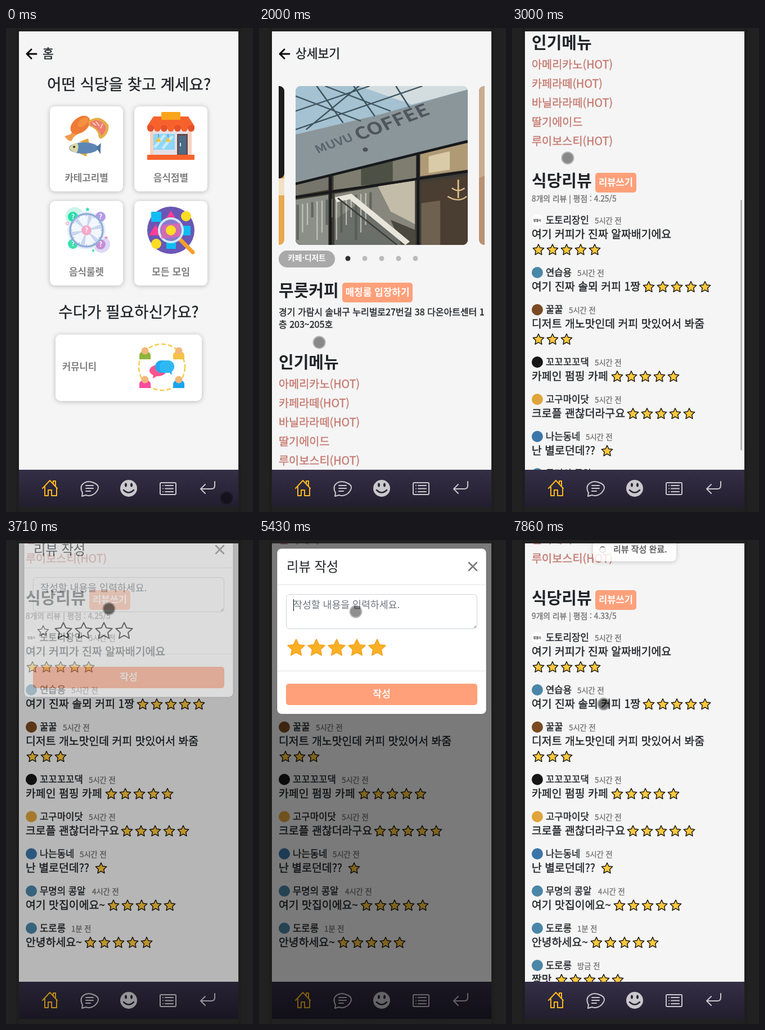
Animation, 439 px wide and 859 px high, one loop 8 s. Source, as an HTML page:

```html
<!DOCTYPE html>
<html lang="ko">
<head>
<meta charset="utf-8">
<style>
html, body { margin: 0; width: 100%; height: 100%; overflow: hidden; background: #212122; }
svg { display: block; }
#stage { width: 100vw; height: 100vh; }
text { font-family: "Noto Sans CJK KR", "Noto Sans CJK", sans-serif; white-space: pre; }
.card { filter: drop-shadow(0 1px 4px rgba(0,0,0,.25)); }
</style>
</head>
<body>
<script>
const INK = '#212529', SALMON = '#ffa07a', GREY = '#808080';
const LOOP = 8000, FRAME = 1000 / 7;

// Shape helpers
const R = (x, y, w, h, r, fill, more = '') => `<rect x="${x}" y="${y}" width="${w}" height="${h}" rx="${r}" fill="${fill}" ${more}/>`;
const C = (x, y, r, fill, more = '') => `<circle cx="${x}" cy="${y}" r="${r}" fill="${fill}" ${more}/>`;
const E = (x, y, rx, ry, fill, turn = 0) => `<ellipse cx="${x}" cy="${y}" rx="${rx}" ry="${ry}" fill="${fill}" transform="rotate(${turn} ${x} ${y})"/>`;
const F = (d, fill, more = '') => `<path d="${d}" fill="${fill}" ${more}/>`;
const L = (d, color, w, more = '') => `<path d="${d}" fill="none" stroke="${color}" stroke-width="${w}" ${more}/>`;
// Medium text gets a hairline stroke, as only regular and bold may be installed
const T = (x, y, size, text, fill = INK, weight = 500, more = '') =>
  `<text x="${x}" y="${y + size * .37}" font-size="${size}" font-weight="${weight}" fill="${fill}" ${weight === 500 ? `stroke="${fill}" stroke-width=".4"` : ''} ${more}>${text}</text>`;
const M = (x, y, size, text, fill, weight) => T(x, y, size, text, fill, weight, 'text-anchor="middle"');
const G = (id, body, more = '') => `<g id="${id}" ${more}>${body}</g>`;
const rep = (n, f) => Array.from({ length: n }, (_, i) => f(i)).join('');
const star = (x, y, r, more) => {
  const pts = rep(10, i => {
    const a = i * Math.PI / 5 - Math.PI / 2, q = i % 2 ? r * .48 : r;
    return `${(x + q * Math.cos(a)).toFixed(1)},${(y + q * Math.sin(a)).toFixed(1)} `;
  });
  return `<polygon points="${pts}" stroke-linejoin="round" ${more}/>`;
};
let clips = 0;
const photo = (id, x, y, w, h) => {
  const c = 'clip' + clips++;
  return `<clipPath id="${c}">${R(x, y, w, h, 9, '#000')}</clipPath>
    <g clip-path="url(#${c})"><use href="#${id}" x="${x}" y="${y}" width="${w}" height="${h}"/></g>`;
};
const scene = (id, body) => `<symbol id="${id}" viewBox="0 0 163 190" preserveAspectRatio="none">${body}</symbol>`;

const cafe = scene('cafe',
  R(0, 0, 163, 190, 0, '#8b969b') + F('M0 0H163V4L80 34 0 58Z', '#a5c2d2') + F('M60 0H163V4L110 22Z', '#d3dde0') +
  L('M0 30L70 0M0 52L120 0M20 0L45 44M55 0L75 36M95 0L108 26M10 52L60 0M0 12L62 42M28 0L90 30', '#40555f', 1.5) +
  F('M0 117L163 66V190H0Z', '#3f3b35') +
  F('M0 118L31 108V124L0 131Z', '#75756b') + F('M36 106L114 82V112L36 124Z', '#7e7d70') + F('M62 98L92 90V116L62 119Z', '#4d5044') +
  F('M118 81L163 68V100L118 108Z', '#b09a76') + F('M126 84l20-6v22l-20 4z', '#d9cba8') +
  F('M0 136L31 130V190H0Z', '#8b8f87') + F('M37 129L113 113V190H37Z', '#87877d') +
  F('M78 120L113 113V165L90 150Z', '#c3bca8') + F('M37 160L60 140 108 190H37Z', '#6b6f69') + F('M90 160L113 172V190H100Z', '#4b483f') +
  F('M119 115L163 107V190H119Z', '#4a3d32') + F('M119 140l18-3v53h-18z', '#6e614f') +
  rep(16, i => L(`M${2 + i * 4.6} ${142 - i}V${184 - i % 4 * 9}`, i % 3 ? '#d6d9cf' : '#4e574f', i % 3 ? 1.2 : 2.2, 'opacity=".7"')) +
  L('M38 136L52 132 106 188', '#e8e5da', 6) + L('M40 134L96 190', '#3b3d39', 1.5) +
  L('M0 133L163 102M0 117L163 66', '#17191b', 3) + L('M33 108V190M116 82V190', '#17191b', 2.5) +
  L('M148 122q6 6 12 0M154 112v22M144 132q10 8 18 0', '#e0c088', 1.5) +
  C(66, 76, 2.5, '#4b5155') +
  `<g transform="rotate(-25 21 81)">${T(21, 76, 13, 'MUVU', '#5b656b', 700)}</g>
   <g transform="rotate(-25 60 66)">${T(60, 58, 20, 'COFFEE', '#4e575c', 700)}</g>`);

const wing = (x, y, turn) => `<g transform="translate(${x} ${y}) rotate(${turn})">` + R(-17, -16, 34, 32, 9, '#a8652c') +
  rep(9, i => R(-13 + i % 3 * 9.5, -12 + (i / 3 | 0) * 9, 6.5, 6, 1.5, '#653716')) + L('M-14 -14H14', '#d39a52', 2) + '</g>';
const waffle = scene('waffle',
  R(0, 0, 163, 190, 0, '#b99274') + F('M0 0H163V40L90 60 0 110Z', '#c9ab90') + F('M100 0H163V70L110 45Z', '#dac7b2') +
  F('M20 92L112 48 163 130V152L30 190Z', '#6d6960') + F('M26 95L110 54 157 136 36 182Z', '#979186') +
  F('M100 87L126 76 152 126 128 143Z', '#bdbdc2') + L('M112 84L140 134', '#9c9ca4', 2) +
  C(65, 129, 44, '#201f22') + C(65, 129, 35, '#333135') +
  wing(47, 116, 35) + wing(87, 117, -35) + wing(67, 142, 0) +
  E(68, 118, 13, 15, '#e3bb8a') + E(70, 114, 8, 9, '#f1dcbb') +
  L('M88 62L110 128M100 66L112 118', '#222124', 4) +
  F('M7 22L43 16 47 88 30 94Z', '#e4dfda') + F('M8 24L43 18 44 50 14 56Z', '#8a5540') + E(25, 20, 19, 8, '#cfc6bd', -8) + E(25, 17, 13, 4, '#a5826b', -8) +
  F('M54 12L86 8 83 68 64 72Z', '#e9e5e0') + F('M55 14L85 10 83 36 58 42Z', '#8f5a40') + E(70, 10, 17, 7, '#d3cac1', -6) + E(70, 7, 11, 3, '#a5826b', -6) +
  L('M26 20L20 0M72 8L76 0', '#f3f0ec', 3));

const shrimp = scene('shrimp',
  R(0, 0, 163, 190, 0, '#f0efed') + E(70, 20, 90, 50, '#fafaf9') +
  F('M0 108Q30 85 70 108T163 100V190H0Z', '#c99f70') + E(18, 122, 22, 14, '#a9a46c') + E(20, 112, 9, 6, '#c7583f') + E(6, 136, 14, 9, '#d2755a') +
  E(34, 155, 40, 20, '#e9cda4') + E(24, 166, 26, 9, '#a8713f') + E(115, 128, 34, 22, '#b37342') + E(140, 152, 32, 18, '#ecd3b1') + E(90, 172, 40, 14, '#8c5730') +
  E(50, 140, 10, 5, '#6c6632', 30) + E(136, 118, 18, 10, '#6d3d25', -15) + E(110, 156, 20, 9, '#dbb17d', 10) + E(152, 174, 18, 7, '#7c4a2b', -20) +
  F('M0 168Q70 190 163 178V190H0Z', '#f6f1e8') +
  F('M163 15L112 40 118 47 163 25ZM163 42L112 67 114 75 163 52Z', '#1d1a1b') +
  E(95, 52, 30, 19, '#966127', 10) + E(96, 47, 20, 9, '#c3924c', 12) + E(86, 74, 20, 30, '#eabb84', 50) + E(84, 70, 10, 18, '#f7dab0', 50) + E(112, 60, 19, 15, '#cc9755', 20) +
  E(82, 106, 25, 32, '#eec2a0', -25) + F('M64 88Q84 108 104 112L92 122Q68 112 58 98Z', '#dd5230') +
  F('M58 116Q68 134 86 142L80 160 64 150Z', '#cf4126') + E(92, 126, 12, 18, '#f7e2cf', -20));

const map = scene('map',
  R(0, 0, 163, 190, 0, '#2f363b') +
  F('M75 48L112 44 124 62 116 76 92 74 78 62Z', '#36491f') +
  rep(24, i => C(82 + i % 6 * 6 + (i % 12 > 5 ? 3 : 0), 51 + (i / 6 | 0) * 6, .9, '#b7c93f')) +
  L('M35 82L62 72 76 92 58 120 38 108ZM76 92L110 98 128 80M58 120L86 132 100 180M110 98L104 140 118 160M68 120L60 150 66 190M62 72L56 45M86 132L140 128M104 140L90 165M128 80L140 100', '#4b5359', 2.2, 'stroke-linejoin="round"') +
  L('M78 48Q74 38 80 30q4-4-1-6M72 22q8 2 16-2', '#dcc57c', 1) +
  C(110, 95, 4, '#7eb07e') + T(104, 90, 5, '숲길', '#ddd', 400) +
  rep(12, i => T(20 + i * 47 % 110, 36 + i * 31 % 120, 4, '골목길', '#9aa0a5', 400)));

const arrow = L('M54 46H37M45 38L37 46 45 54', '#0a0a0a', 3, 'stroke-linecap="round" stroke-linejoin="round"');
const head = title => arrow + T(65, 45.5, 21.5, title);
const card = (x, y, w, h) => R(x, y, w, h, 9, '#fff', 'class="card"');
const button = (x, y, w, h, size, text, weight = 700) => R(x, y, w, h, 5, SALMON) + M(x + w / 2, y + h / 2 - 1, size, text, '#fff', weight);

// Home screen
const food =
  F('M104 192L114 189 123 179 130 186 120 194 116 201 110 199Z', '#f39a4b') +
  E(132, 172, 20, 13, '#ef7b35', -40) + E(137, 167, 11, 6, '#f59043', -40) +
  F('M146 166Q166 150 182 172Q184 188 170 196Q164 198 164 188Q160 178 148 174Z', '#e3ae48') +
  F('M149 168Q165 157 177 174Q179 184 169 191Q167 180 150 172Z', '#f07a70') +
  L('M160 166l6 8M172 170l-4 8M154 168l6 5', '#fbd0c5', 2) +
  F('M130 202l16-6 2 9zM128 221l14 7 4-9z', '#e0a43e') + E(138, 213, 26, 10, '#5e86b5') +
  F('M160 212L169 204 168 213 168 224Z', '#4d76a4') + F('M112 213Q118 204 127 204Q131 213 125 222Q116 219 112 213Z', '#dcd7a6') + C(121, 211, 2, '#333');
const shop =
  R(256, 182, 74, 44, 0, '#e3e0e6') + R(256, 182, 6, 44, 0, '#f5d2c2') + R(324, 182, 6, 44, 0, '#f5d2c2') +
  R(262, 188, 38, 28, 0, '#8fd5f7') + L('M264 212L282 190M278 214L296 192', '#c4edff', 5) +
  F('M266 202l5-8 5 8zM283 202l5-8 5 8z', '#fbc531') + L('M271 188v6M288 188v6', '#667', 1) +
  R(304, 188, 19, 38, 0, '#6a4a4a') + R(307, 191, 13, 33, 0, '#4a6c86') + R(309, 204, 2, 6, 0, '#d9e7ee') +
  F('M262 157H324L335 174V178H251V174Z', '#f7622c') + rep(7, i => C(257 + i * 12, 178, 6, i % 2 ? '#f7622c' : '#e5512a')) +
  R(276, 149, 34, 14, 2, '#f9a51c') + R(251, 225, 84, 9, 1, '#f7622c');
const wheel =
  C(122, 334, 16, '#c9f5e8') + C(170, 384, 15, '#dcd8f6') + C(143, 359, 34, '#e6eefb') +
  [[119, 335, '#26e0a9'], [168, 335, '#b39be6'], [119, 383, '#3fdfae'], [168, 384, '#c78fd6']].map(([x, y, c]) =>
    C(x, y, 9, c) + M(x, y, 12, '?', '#fff', 700)).join('') +
  C(143, 359, 29, '#f2f7ff', 'stroke="#93add8" stroke-width="3.5"') +
  rep(6, i => F('M143 359L139 332H147Z', '#c9d6ee', `transform="rotate(${i * 60 + 15} 143 359)"`)) +
  rep(12, i => C(143, 333, 1, '#8fb7dd', `transform="rotate(${i * 30} 143 359)"`)) +
  C(143, 359, 9, '#f6a9cb') + M(143, 359, 12, '?', '#fff', 700) +
  star(145, 322, 4, 'fill="#26e0a9"') + star(178, 372, 3, 'fill="#ee7fb0"') + C(109, 347, 2.5, 'none', 'stroke="#ee7fb0"') + star(155, 395, 3, 'fill="#26e0a9"');
const finder =
  C(293, 359, 42, '#6a56b5') + R(258, 326, 18, 18, 0, '#10bdf2') + F('M293 324L305 344H281Z', '#fd3d98') + C(320, 334, 9, '#fbdd25') +
  F('M266 349L278 368H254Z', '#fd3d98') + R(311, 351, 17, 17, 0, '#10bdf2') + C(267, 383, 9, '#fbdd25') + R(285, 375, 17, 17, 0, '#10bdf2') +
  L('M310 376L332 398', '#f7a02d', 7, 'stroke-linecap="round"') + C(293, 359, 21, '#8a79cb', 'stroke="#cfeafc" stroke-width="4"') +
  F('M276 350l34-4v24l-34 4z', '#f066ab', 'opacity=".7"') + C(293, 359, 9, '#fbdd25');
const person = (x, y, c) => F(`M${x - 10} ${y + 11}V${y + 3}Q${x - 9} ${y - 3} ${x} ${y - 3}T${x + 10} ${y + 3}V${y + 11}Z`, c) + C(x, y - 4, 6.5, '#f2b778');
const talk =
  C(277, 602, 41, 'none', 'stroke="#f8cb4d" stroke-width="2.5" stroke-dasharray="8 4"') +
  person(247, 577, '#8fb53a') + person(307, 577, '#f5c243') + person(247, 628, '#f94c9e') + person(307, 628, '#1aa5ee') +
  E(270, 608, 15, 10, '#fb5590') + F('M262 614l-1 8 10-6z', '#fb5590') +
  R(265, 590, 34, 22, 11, '#21a9f5') + F('M288 608l6 8 1-9z', '#21a9f5') + R(273, 590, 26, 22, 11, '#39c4f3', 'opacity=".6"');
const home = head('홈') + M(218.5, 100, 27.7, '어떤 식당을 찾고 계세요?') +
  card(78, 139, 130, 151) + card(228, 139, 130, 151) + card(78, 307, 130, 150) + card(228, 307, 130, 150) +
  food + shop + wheel + finder +
  M(143, 266, 16.8, '카테고리별', GREY, 700) + M(293, 266, 16.8, '음식점별', GREY, 700) +
  M(143, 433, 16.8, '음식룰렛', GREY, 700) + M(293, 433, 17.2, '모든 모임', GREY, 700) +
  M(218, 504, 27.6, '수다가 필요하신가요?') + card(88, 544, 260, 118) + T(100, 601, 16.6, '커뮤니티', GREY, 700) + talk;

// List screen
const rule = y => R(35, y, 366, 1, 0, '#bdbdbd');
const place = (n, y, a, b, kind, name, far) =>
  photo(a, 45, y, 163, 191) + photo(b, 228, y, 163, 191) +
  R(45, y + 201, 30, 30, 8, '#8b8e8b') + M(60, y + 214, 14, n, '#fff', 700) +
  R(80, y + 201, 100, 30, 15, '#ff8d7a') + M(130, y + 214, 13.7, kind, '#fff', 700) +
  T(45, y + 252, 24.2, name, '#0a0a0a') + T(45, y + 289, 17.6, far);
const list = head('모든 목록') +
  R(45.5, 98.5, 253, 34, 5, '#fff', 'stroke="#333"') + T(56, 114, 17, '검색어를 입력하세요', '#757575') +
  button(336, 98, 55, 35, 17.4, '검색') + rule(149) +
  place(1, 176, 'cafe', 'waffle', '카페·디저트', '무릇커피', '별점거리 48.04km') + rule(495) +
  place(2, 522, 'shrimp', 'map', '중식', '두메차이나 솔뫼점', '');

// Detail screen: [avatar, name, time x, time, text, row y, stars x, star line offset, stars]
const reviews = [
  ['#fff', '도토리장인', 147, '5시간 전', '여기 커피가 진짜 알짜배기에요', 709, 47, 52, 5],
  ['#4a86a8', '연습용', 116, '5시간 전', '여기 진짜 솔뫼 커피 1짱', 802, 243, 25, 5],
  ['#7a4a22', '꿀꿀', 101, '5시간 전', '디저트 개노맛인데 커피 맛있어서 봐줌', 868, 47, 52, 3],
  ['#161616', '꼬꼬꼬꼬댁', 147, '5시간 전', '카페인 펌핑 카페', 961, 187, 25, 5],
  ['#e0a43c', '고구마이닷', 147, '5시간 전', '크로플 괜찮더라구요', 1027, 215, 25, 5],
  ['#3b76a8', '나는동네', 131, '5시간 전', '난 별로던데??', 1093, 169, 25, 1],
  ['#4a86a8', '무명의 콩알', 153, '4시간 전', '여기 맛집이에요~', 1159, 191, 25, 5],
  ['#4a86a8', '도로롱', 116, '1분 전', '안녕하세요~', 1225, 150, 25, 5],
  ['#4a86a8', '도로롱', 116, '방금 전', '짱맛', 1291, 88, 25, 5]
];
const review = ([color, name, tx, when, text, y, sx, dy, n], i) => G('review' + i,
  C(45, y, 10, color) + (i ? '' : M(45, y, 5, '밥톨이', '#222', 700)) +
  T(60, y - .5, 16.7, name) + T(tx, y + 1, 13.3, when, '#777') + T(35, y + 24.5, 19.4, text) +
  rep(n, k => star(sx + k * 25, y + dy + 1, 10.2, 'fill="#ffc83d" stroke="#111" stroke-width="1.4"')));
const menu = ['아메리카노(HOT)', '카페라떼(HOT)', '바닐라라떼(HOT)', '딸기에이드', '루이보스티(HOT)'];
const detail =
  `<g transform="translate(0 -199)">${head('상세보기')}</g>` +
  `<clipPath id="rail">${R(35, -97, 366, 284, 0, '#000')}</clipPath><g clip-path="url(#rail)">` +
  R(-261, -96, 306, 282, 9, '#e8a850') + R(-261, -96, 306, 164, 9, '#1d1b1c') + R(35, 68, 10, 30, 0, '#f0e0c4') +
  photo('cafe', 65, -96, 306, 282) + photo('waffle', 391, -96, 306, 282) + '</g>' +
  R(35, 196, 100, 30, 15, '#a9a9a9') + M(85, 209, 13.7, '카페·디저트', '#fff', 700) +
  rep(5, i => C(158 + i * 30, 210, 4.5, i ? '#bbb' : '#333')) +
  T(35, 267, 29, '무릇커피', INK, 700) + button(148, 253, 125, 35, 17, '매칭룸 입장하기') +
  T(35, 305, 16, '경기 가람시 솔내구 누리벌로27번길 38 다온아트센터 1') + T(35, 327, 16, '층 203~205호') +
  T(35, 394, 29, '인기메뉴', INK, 700) + menu.map((m, i) => T(35, 433 + i * 34, 19.7, m, '#c67a70')).join('') +
  T(35, 639, 29, '식당리뷰', INK, 700) + button(148, 625, 73, 35, 16.6, '리뷰쓰기') +
  T(35, 671, 13.8, '', '#777', 500, 'id="score"') + reviews.map(review).join('');

const line = 'stroke-linecap="round" stroke-linejoin="round"', PALE = '#c9c8cc';
const nav = R(23, 784, 390, 66, 0, 'url(#dusk)') +
  L('M65 817L78 803 91 817M69 814V830H75V820H81V830H90V816M84 808V804H88V813', '#fbb81e', 2, line) +
  L('M136 825Q130 814 138 808T158 808T158 826Q150 832 142 829L135 831ZM142 812h13M142 817h13M142 822h8', PALE, 2, line) +
  C(218, 817, 15, PALE) + E(213, 811, 2, 3.5, '#2b2639') + E(223, 811, 2, 3.5, '#2b2639') + L('M209 820Q218 829 227 820', '#2b2639', 2.5, line) +
  L('M276 807H300Q302 807 302 809V826Q302 828 300 828H276Q274 828 274 826V809Q274 807 276 807ZM283 812H297M283 817.5H297M283 823H297M279 812h.1M279 817.5h.1M279 823h.1', PALE, 2, line) +
  L('M371 805V812Q371 818 365 818H347M354 810L346 818 354 826', PALE, 2, line);

const modal =
  R(32, 15, 372, 294, 8, '#fff', 'stroke="#000" stroke-opacity=".3"') + T(49, 47, 23.3, '리뷰 작성', INK, 300) +
  L('M373 40L387 54M387 40L373 54', '#777', 2.5, line) + R(32, 79, 372, 1, 0, '#dee2e6') + R(32, 232, 372, 1, 0, '#dee2e6') +
  R(46, 94, 344, 66, 8, 'none', 'id="ring" stroke="#c2dbfe" stroke-width="4"') +
  R(48.5, 96.5, 339, 61, 6, '#fff', 'id="field"') + L('M382 156l4-4M385 156l1-1', '#555', 1) +
  T(61, 115, 17.3, '작성할 내용을 입력하세요.', '#6c757d', 400, 'id="hint"') + T(61, 115, 17.4, '', INK, 400, 'id="typed"') +
  R(0, 123, 16, 1, 0, INK, 'id="under"') + R(0, 105, 1, 21, 0, '#000', 'id="caret"') +
  rep(5, i => `<g transform="translate(${66 + i * 36} 192)">${star(0, 0, 15.5, 'class="rate" stroke-width="2"')}</g>`) +
  button(48, 255, 340, 38, 17.4, '작성', 500);

const toast = R(144, -22, 148, 44, 8, '#fff', 'class="card"') +
  C(161, 1, 5, 'none', 'stroke="#e0e0e0" stroke-width="2"') + L('M161 -4A5 5 0 0 1 166 1', '#616161', 2, 'id="spin"') + T(180, 0, 15, '리뷰 작성 완료.', '#363636');

document.body.innerHTML = `<svg id="stage" viewBox="0 0 439 859" preserveAspectRatio="none"><defs>
  <linearGradient id="dusk" x2="0" y2="1"><stop stop-color="#352f46"/><stop offset="1" stop-color="#221e2f"/></linearGradient>
  <clipPath id="screen">${R(23, 6, 390, 844, 0, '#000')}</clipPath>${cafe + waffle + shrimp + map}</defs>` +
  R(0, 0, 439, 859, 0, '#212122') + R(18, 0, 5, 859, 0, '#1e1e1f') + R(413, 0, 5, 859, 0, '#1e1e1f') +
  `<g clip-path="url(#screen)">` + R(23, 6, 390, 844, 0, '#f5f5f5') +
  G('home', home) + G('list', list) + G('detail', detail) + nav + R(406, 0, 3, 445, 1.5, '#b4b4b4', 'id="bar"') +
  R(23, 6, 390, 844, 0, '#000', 'id="shade"') + G('modal', modal) + G('toast', toast) + '</g>' +
  G('touch', C(0, 0, 11.5, '#000', 'opacity=".27"') + C(0, 0, 9.5, '#000', 'id="dot"')) + '</svg>';

// Motion
const $ = id => document.getElementById(id);
const set = (el, attrs) => { for (const k in attrs) el.setAttribute(k, attrs[k]); };
const show = (id, on) => $(id).setAttribute('display', on ? 'inline' : 'none');
const ramp = (t, a, b) => Math.min(1, Math.max(0, (t - a) / (b - a)));
const smooth = p => p * p * (3 - 2 * p);
const track = (keys, t, col, ease = p => p) => {
  let i = 0;
  while (i < keys.length - 2 && t >= keys[i + 1][0]) i++;
  const a = keys[i], b = keys[i + 1];
  return a[col] + (b[col] - a[col]) * ease(ramp(t, a[0], b[0]));
};
const path = [[0, 392, 834], [570, 293, 215], [720, 293, 215], [1290, 158, 490], [1570, 140, 425], [1700, 140, 425],
  [2250, 82, 659], [2300, 82, 659], [2430, 82, 590], [2570, 82, 460], [2860, 84, 250], [3430, 183, 122], [3860, 183, 122],
  [4350, 62, 190], [4900, 210, 194], [5000, 210, 194], [5400, 172, 127], [5860, 172, 127], [6000, 173, 133], [7290, 173, 133],
  [7480, 172, 274], [7600, 172, 274], [7860, 163, 291], [8000, 163, 291]];
const scrolls = [[2300, 0], [2430, 69], [2570, 199], [2860, 470], [3150, 670], [3430, 735]];
const presses = [[600, 700], [1570, 1700], [2300, 2860], [3560, 3780], [4900, 5000], [7500, 8000]];
const steps = ['ㅉ', '짜', '짱', '짱마', '짱맛'];
const OPEN = 3632, CLOSE = 7560, SAVED = 7640, TYPE = 6285;

function draw(t) {
  show('home', t < 710);
  show('list', t >= 710 && t < 1710);
  show('detail', t >= 1710);
  const scroll = track(scrolls, t, 1);
  set($('detail'), { transform: `translate(0 ${Math.round(199 - scroll)})` });
  show('bar', t > 2400 && t < 3600);
  set($('bar'), { y: 6 + scroll * 844 / 1600 });

  const saved = t >= SAVED;
  $('score').textContent = saved ? '9개의 리뷰 | 평점 : 4.33/5' : '8개의 리뷰 | 평점 : 4.25/5';
  show('review8', saved);

  const alpha = ramp(t, OPEN, OPEN + 150) - ramp(t, CLOSE, CLOSE + 150);
  const slide = p => 1 - (1 - p) ** 1.65;
  const drop = slide(ramp(t, OPEN, OPEN + 300)) - slide(ramp(t, CLOSE, CLOSE + 300));
  set($('shade'), { opacity: alpha / 2 });
  set($('modal'), { opacity: alpha, transform: `translate(0 ${Math.round(50 * drop - 50)})` });

  const x = track(path, t, 1, smooth), y = track(path, t, 2, smooth);
  const lit = t < 4350 ? 0 : t > 4900 ? 5 : Math.floor((x - 48) / 36) + 1;
  document.querySelectorAll('.rate').forEach((s, i) => set(s, {
    fill: i < lit ? '#fbb024' : '#fff',
    stroke: i < lit ? '#f5a623' : '#222',
    transform: `scale(${i ? 1 : .65 + .35 * ramp(t, 3720, 3860)})`
  }));

  const focus = ramp(t, 5430, 5580);
  set($('ring'), { opacity: focus });
  set($('field'), { stroke: focus > .5 ? '#86b7fe' : '#ced4da' });
  const step = Math.min(4, Math.floor((t - TYPE) / FRAME));
  const typed = step < 0 ? '' : steps[step];
  const end = 61 + typed.length * 16;
  $('typed').textContent = typed;
  show('hint', !typed);
  show('under', typed);
  set($('under'), { x: end - 16 });
  set($('caret'), { x: end });
  const since = t < TYPE ? t - 5400 : Math.max(0, t - TYPE - 572);
  show('caret', since >= 0 && since % 1060 < 530);

  const rise = ramp(t, 7740, 8000);
  set($('toast'), { opacity: rise ? .6 + .4 * ramp(t, 7740, 7940) : 0, transform: `translate(0 ${track([[7740, -30], [7860, 16], [8000, 40]], t, 1)})` });
  set($('spin'), { transform: `rotate(${t * .36} 161 1)` });

  set($('touch'), { transform: `translate(${x} ${y})` });
  set($('dot'), { opacity: presses.some(([a, b]) => t >= a && t < b) ? .36 : .23 });
}

const start = performance.now();
function tick() {
  const t = (performance.now() - start) % LOOP;
  draw(Math.round(Math.floor((t + 4) / FRAME) * FRAME / 10) * 10);
  requestAnimationFrame(tick);
}
tick();
</script>
</body>
</html>
```
